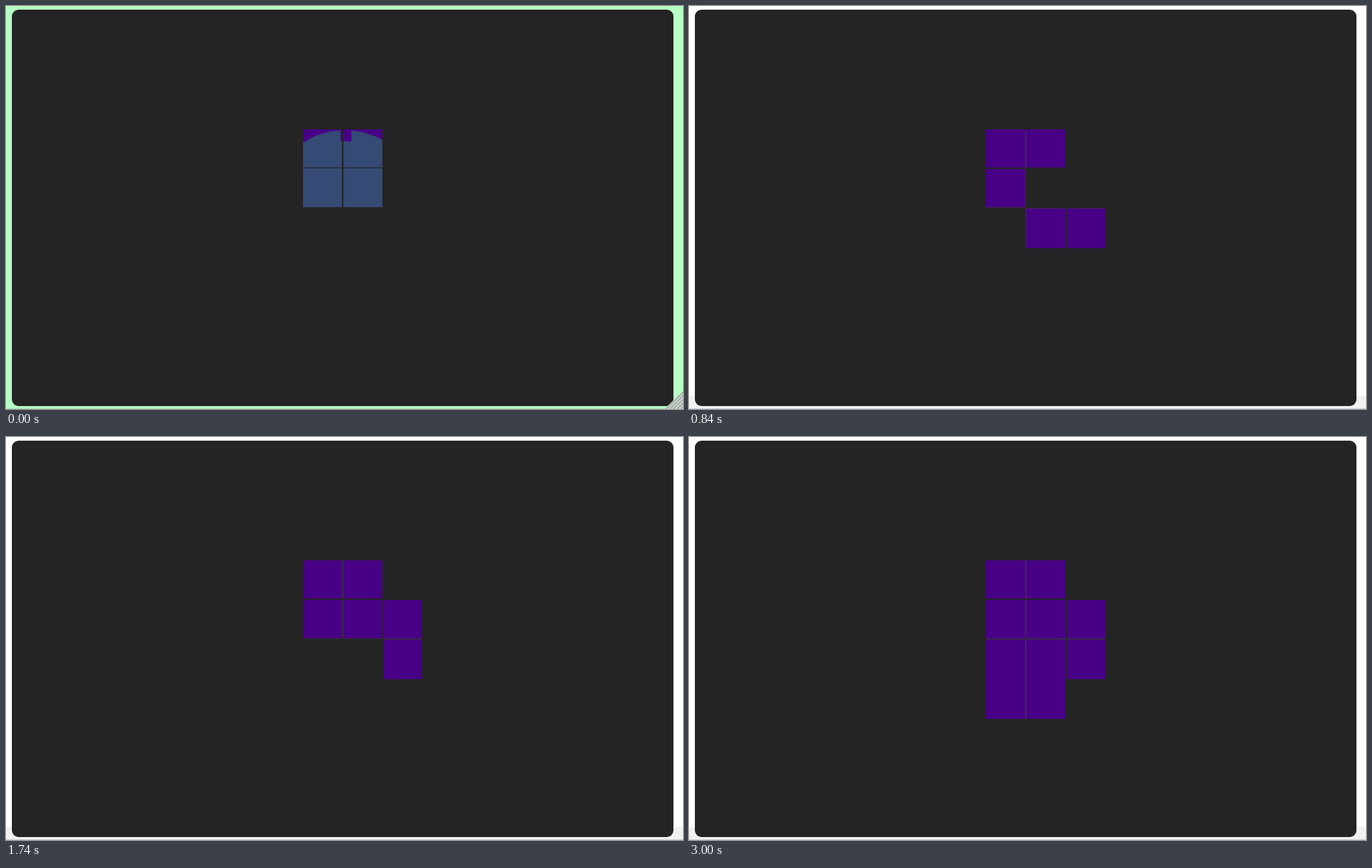
These frames come from a looping animation (921 by 549 pixels, 3.12 s). An HTML page with a canvas:

```html
<!DOCTYPE html>
<html>
<head>
<meta charset="utf-8">
<style>
  html, body { margin: 0; width: 100%; height: 100%; overflow: hidden; background: #fff; }
  canvas { display: block; }
</style>
</head>
<body>
<canvas id="stage" width="921" height="549"></canvas>
<script>
const ctx = document.getElementById('stage').getContext('2d');
const LOOP = 3120, INTRO = 60;
const DARK = '#242424', PURPLE = '#480086', SEAM = '#3b2a4d', BLUE = '#354a75';

// [start, end] of each grid column and row
const cols = [[404, 457], [459, 512], [514, 566]];
const rows = [[168, 220], [222, 274], [276, 330], [330, 384]];

// Each step flips one cell: [time, column, row]
const steps = [
  [0, 0, 0], [0, 1, 0], [0, 0, 1], [0, 1, 1],
  [240, 1, 1], [480, 1, 2], [840, 2, 2], [1140, 2, 1], [1440, 1, 1],
  [1740, 1, 2], [2100, 0, 2], [2400, 0, 3], [2700, 1, 3], [3000, 1, 2]
];

function box(color, x0, y0, x1, y1) {
  ctx.fillStyle = color;
  ctx.fillRect(x0, y0, x1 - x0, y1 - y0);
}

function panel() {
  ctx.fillStyle = DARK;
  ctx.beginPath();
  ctx.roundRect(8, 5, 900, 540, 9);
  ctx.fill();
}

function cell(c, r) {
  const [x0, x1] = cols[c], [y0, y1] = rows[r];
  box(PURPLE, x0, y0, x1, y1);
  if (c === 0) box(SEAM, 457, y0, 458, y1);
  if (c === 1) box(SEAM, 458, y0, 459, y1);
  if (r === 1) box(SEAM, x0, 274, x1, 275);
  if (r === 2) box(SEAM, x0, 275, x1, 276);
}

function grip() {
  ctx.save();
  ctx.beginPath();
  ctx.moveTo(921, 524);
  ctx.lineTo(921, 549);
  ctx.lineTo(896, 549);
  ctx.clip();
  box('#c9d3c9', 896, 524, 921, 549);
  ctx.strokeStyle = '#a3aaa3';
  ctx.lineWidth = 1.5;
  for (let d = 2; d < 25; d += 5) {
    ctx.beginPath();
    ctx.moveTo(896 + d, 549);
    ctx.lineTo(921, 524 + d);
    ctx.stroke();
  }
  ctx.restore();
}

function intro() {
  box('#b7ffc4', 0, 0, 921, 549);
  box('#a9dfb3', 0, 548, 921, 549);
  panel();
  grip();
  ctx.save();
  ctx.beginPath();
  ctx.rect(404, 168, 108, 106);
  ctx.clip();
  box(PURPLE, 404, 168, 512, 274);
  ctx.fillStyle = BLUE;
  ctx.beginPath();
  ctx.arc(461, 272, 103, 0, 7);
  ctx.fill();
  box(BLUE, 404, 220, 512, 274);
  box(PURPLE, 455, 168, 470, 184.5);
  box('#420078', 462, 169, 463, 183);
  ctx.restore();
  box(DARK, 457, 168, 459, 274);
  box(DARK, 404, 220, 512, 221);
}

function grid(t) {
  box('#fff', 0, 0, 921, 549);
  box('#f1f1f1', 0, 531, 921, 548);
  box('#d0d0d0', 0, 548, 921, 549);
  panel();
  const on = new Set();
  for (const [time, c, r] of steps) {
    const key = r * 3 + c;
    if (time <= t && !on.delete(key)) on.add(key);
  }
  for (const key of on) cell(key % 3, Math.floor(key / 3));
}

function draw() {
  const t = performance.now() % LOOP;
  if (t < INTRO) intro();
  else grid(t);
  requestAnimationFrame(draw);
}
draw();
</script>
</body>
</html>
```
